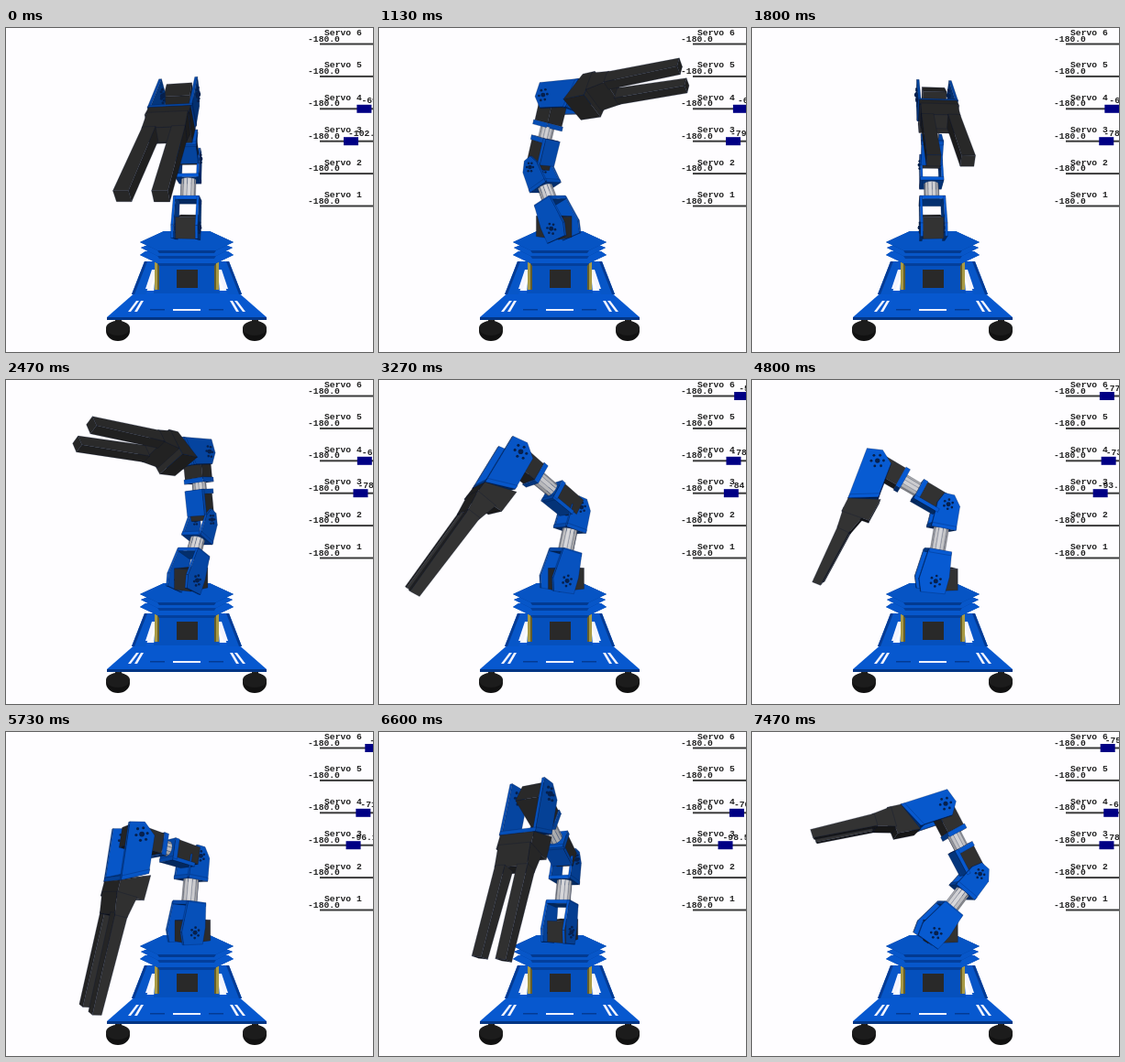
Write an HTML page with a canvas that moves like this. It is 400x354 px and loops after 7540 ms.

```html
<!DOCTYPE html>
<html lang="en">
<head>
<meta charset="utf-8">
<title>Robot arm</title>
<style>
html, body { margin: 0; width: 100%; height: 100%; overflow: hidden; background: #fefdff; }
canvas, svg { position: absolute; left: 0; top: 0; width: 400px; height: 354px; }
text { font: bold 9.7px "Liberation Mono", "DejaVu Sans Mono", monospace; fill: #222; }
</style>
</head>
<body>
<canvas id="stage" width="400" height="354"></canvas>
<svg id="panel" viewBox="0 0 400 354"></svg>
<script>
const ctx = document.getElementById('stage').getContext('2d');
const panel = document.getElementById('panel');
const LOOP = 7540, STEP = 200 / 3, LAST = 112;
const DIST = 320, EYE = 38, CX = 197, CY = 180;
const BLUE = [8, 100, 232], BLACK = [56, 56, 56], GREY = [232, 232, 235];

// step, yaw, then reach and height of elbow, wrist and tip
const KEYS = [
  [0, 9, -20, 77, 47, 129, 160, 36],
  [14, -26, -24, 75, 36, 130, 116, -6],
  [17, -50, -33, 67, -8, 142, 130, 132],
  [24, -18, -32, 68, -4, 141, 118, 118],
  [30, 8, -26, 74, 30, 136, 118, -4],
  [37, 37, -31, 67, -18, 141, 127, 120],
  [42, 56, -18, 78, 40, 138, 160, 90],
  [49, 56, -20, 79, 56, 125, 145, 0],
  [60, 65, -5, 82, 74, 82, 98, -70],
  [72, 77, -14, 81, 60, 121, 117, 1],
  [80, 72, -8, 82, 68, 94, 100, -50],
  [92, 30, -10, 82, 65, 95, 115, -68],
  [99, 26, -18, 80, 56, 130, 115, -8],
  [LAST, 75, -50, 63, -9, 135, 121, 97]
];
// step, servo 3, servo 4
const SERVOS = [[0, -102, -69], [17, -79, -61], [37, -78, -68], [49, -84, -78],
  [72, -93.6, -73], [99, -98.5, -70], [LAST, -78, -67]];

const rad = d => d * Math.PI / 180;
const mix = (a, b, k) => a + (b - a) * k;
const clamp = (v, lo, hi) => Math.min(hi, Math.max(lo, v));
const add = (a, b, k = 1) => a.map((v, i) => v + b[i] * k);
const dot = (a, b) => a[0] * b[0] + a[1] * b[1] + a[2] * b[2];
const cross = (a, b) => [a[1] * b[2] - a[2] * b[1], a[2] * b[0] - a[0] * b[2], a[0] * b[1] - a[1] * b[0]];
const unit = a => a.map(v => v / (Math.hypot(...a) || 1));
const centre = pts => pts.reduce((s, p) => add(s, p), [0, 0, 0]).map(v => v / pts.length);
const scaleAt = p => DIST / (DIST - p[2]);
const project = p => [CX + p[0] * scaleAt(p), CY + (EYE - p[1]) * scaleAt(p)];

// Links as angle from vertical and length
function links(k) {
  const out = [];
  let r = 0, y = 0;
  for (let i = 2; i < 8; i += 2) {
    out.push(Math.atan2(k[i] - r, k[i + 1] - y), Math.hypot(k[i] - r, k[i + 1] - y));
    r = k[i]; y = k[i + 1];
  }
  return out;
}
const TRACK = KEYS.map(k => [k[0], k[1], ...links(k)]);

function sample(track, n) {
  let i = 0;
  while (i < track.length - 2 && track[i + 1][0] <= n) i++;
  const a = track[i], b = track[i + 1];
  const k = Math.min(1, (n - a[0]) / (b[0] - a[0]));
  return a.map((v, j) => mix(v, b[j], k));
}

let faces = [];

function addFace(pts, mid, col, dots) {
  const c = centre(pts);
  let nrm = unit(cross(add(pts[1], pts[0], -1), add(pts[2], pts[0], -1)));
  if (dot(nrm, add(c, mid, -1)) < 0) nrm = nrm.map(v => -v);
  const view = add([0, EYE, DIST], c, -1);
  const facing = dot(nrm, unit(view));
  if (facing <= 0) return;
  const light = 0.42 + 0.5 * facing + 0.12 * nrm[1];
  faces.push({ pts, far: Math.hypot(...view), dots, fill: `rgb(${col.map(v => Math.min(255, Math.round(v * light)))})` });
}

function solid(a, b, col, dotsA, dotsB) {
  const mid = centre([...a, ...b]);
  addFace(a, mid, col, dotsA);
  addFace(b, mid, col, dotsB);
  a.forEach((p, i) => {
    const j = (i + 1) % a.length;
    addFace([p, a[j], b[j], b[i]], mid, col);
  });
}

const at = (f, u, n, w) => add(add(add(f.o, f.u, u), f.n, n), f.w, w);

function prism(f, poly, w0, w1, col, hub) {
  const side = w => poly.map(([u, n]) => at(f, u, n, w));
  const dots = w => hub && [[0, 0], ...Array.from({ length: 6 }, (_, i) =>
    [hub * Math.cos(i * Math.PI / 3), hub * Math.sin(i * Math.PI / 3)])].map(([u, n]) => at(f, u, n, w));
  solid(side(w0), side(w1), col, dots(w0), dots(w1));
}

const box = (f, u0, u1, n0, n1, w, col) =>
  prism(f, [[u0, n0], [u1, n0], [u1, n1], [u0, n1]], -w, w, col);

function plates(f, poly, w, hub) {
  prism(f, poly, w - 2.5, w, BLUE, hub);
  prism(f, poly, -w, 2.5 - w, BLUE, hub);
}

function tube(f, u0, u1, r) {
  const ring = u => Array.from({ length: 12 }, (_, i) =>
    at(f, u, r * Math.cos(i * Math.PI / 6), r * Math.sin(i * Math.PI / 6)));
  solid(ring(u0), ring(u1), GREY);
}

function buildArm([, deg, a1, l1, a2, l2, a3, l3]) {
  faces = [];
  const yaw = rad(deg);
  const fwd = [-Math.sin(yaw), 0, Math.cos(yaw)], w = [Math.cos(yaw), 0, Math.sin(yaw)];
  const frame = (o, a) => ({
    o, w,
    u: add(fwd.map(v => v * Math.sin(a)), [0, Math.cos(a), 0]),
    n: add(fwd.map(v => -v * Math.cos(a)), [0, Math.sin(a), 0])
  });
  const turret = frame([0, 0, 0], 0);
  const lower = frame([0, 0, 0], a1);
  const elbow = at(lower, l1, 0, 0);
  const lowerEnd = frame(elbow, a1), upper = frame(elbow, a2);
  const wrist = at(upper, l2, 0, 0);
  const upperEnd = frame(wrist, a2), hand = frame(wrist, a3);

  box(turret, -11, 12, -8, 25, 11, BLACK);
  plates(lower, [[-12, 12], [-13, -14], [0, -18], [32, -13], [32, 12], [6, 14]], 14, 5.5);
  box(lower, 29, 33, -12, 12, 14, BLUE);
  tube(lower, 33, l1 - 25, 8.5);

  plates(lowerEnd, [[-25, -14], [-25, 13], [0, 13], [11, 5], [11, -6], [0, -12]], 13, 5);
  box(lowerEnd, -26, -22, -14, 13, 13, BLUE);
  box(upper, 0, 30, -9, 10, 10, BLACK);
  box(upper, 6, 35, -13, -9, 12, BLUE);
  box(upper, 30, 35, -11, 10, 12, BLUE);
  tube(upper, 35, l2 - 31, 8);

  box(upperEnd, -32, -27, -11, 11, 13, BLUE);
  box(upperEnd, -27, 6, -10, 10, 12, BLACK);
  plates(hand, [[-6, 14], [-12, 0], [-4, -13], [32, -16], [46, 9]], 18, 6);
  prism(hand, [[28, -16], [32, -16], [46, 9], [42, 9]], -18, 18, BLUE);

  // The raised gripper rolls with the turn of the base
  const tipY = at(hand, l3, 0, 0)[1];
  const roll = rad(25) * clamp(deg / 37, -1, 1) * clamp((tipY - 97) / 22, 0, 1);
  const c = Math.cos(roll), s = Math.sin(roll);
  const grip = {
    o: wrist, u: hand.u,
    w: add(hand.w.map(v => v * c), hand.n, s),
    n: add(hand.n.map(v => v * c), hand.w, -s)
  };
  prism(grip, [[33, -19], [57, -18], [60, 9], [46, 9]], -17, 17, BLACK);
  prism(grip, [[56, -11], [76, -6], [76, 6], [56, 9]], -16, 16, BLACK);
  const end = (u, m, h, v) => [[-h, -v], [h, -v], [h, v], [-h, v]].map(([x, y]) => at(grip, u, y, m + x));
  for (const k of [-1, 1]) solid(end(74, k * 11, 5, 6), end(l3, k * 11, 4.5, 4), BLACK);
}

function fillPoly(pts, fill) {
  ctx.beginPath();
  pts.forEach(p => ctx.lineTo(p[0], p[1]));
  ctx.closePath();
  ctx.fillStyle = fill;
  ctx.fill();
}

function disc(x, y, rx, ry, fill) {
  ctx.beginPath();
  ctx.ellipse(x, y, rx, ry, 0, 0, 7);
  ctx.fillStyle = fill;
  ctx.fill();
}

function rect(x, y, w, h, fill) {
  ctx.fillStyle = fill;
  ctx.fillRect(x, y, w, h);
}

const flip = pts => pts.map(([x, y]) => [2 * CX - x, y]);
function pair(pts, fill) { fillPoly(pts, fill); fillPoly(flip(pts), fill); }
// Symmetric shape from its left half
const sym = (pts, fill) => fillPoly([...pts, ...flip(pts).reverse()], fill);
// Slanted bar: top left, bottom left, width
const bar = (x0, y0, x1, y1, w, fill) => pair([[x0, y0], [x0 + w, y0], [x1 + w, y1], [x1, y1]], fill);

function tier(backY, back, y, half, top, edge) {
  const rim = [[CX - back, backY], [CX - half, y], [CX - 32, y + 9]];
  sym([...rim, [CX - 30, y + 12]], edge);
  sym(rim, top);
}

function drawBase() {
  for (const x of [122, 271]) {
    rect(x - 3, 316, 7, 8, '#222');
    disc(x, 331, 13, 11, '#111');
    disc(x, 328, 13, 8, '#1c1c1c');
  }
  sym([[143, 287], [110, 316]], '#0758cf');
  sym([[110, 316], [110, 319]], '#033584');
  sym([[164, 252], [161, 290]], '#0550bd');
  bar(151, 255, 137, 291, 15, '#0756c8');
  bar(151, 255, 137, 291, 3, '#033b94');
  bar(159, 264, 152, 285, 5, '#f4f5ff');
  bar(162, 247, 162, 286, 5, '#a89a45');
  bar(165, 247, 165, 286, 2, '#655d2a');
  rect(186, 264, 23, 20, '#292929');
  bar(142, 298, 133, 310, 3, '#f4f5ff');
  bar(147, 298, 140, 310, 3, '#f4f5ff');
  rect(182, 307, 30, 2, '#eef2ff');
  bar(157, 307, 157, 308.5, 16, '#033b94');

  tier(244, 45, 248, 51, '#0757cb', '#033f9c');
  tier(231, 27, 240, 50, '#0756c8', '#033f9c');
  tier(222, 25, 234, 51, '#0654c4', '#023a91');
}

function drawArm(pose) {
  buildArm(pose);
  faces.sort((a, b) => b.far - a.far);
  ctx.lineWidth = 0.5;
  ctx.lineJoin = 'round';
  for (const f of faces) {
    fillPoly(f.pts.map(project), f.fill);
    ctx.strokeStyle = 'rgba(0,15,50,.45)';
    ctx.stroke();
    (f.dots || []).forEach((p, i) => {
      const [x, y] = project(p), r = (i ? 1.3 : 2.4) * scaleAt(p);
      disc(x, y, r, r, '#06204d');
    });
  }
}

function make(tag, attrs, text) {
  const el = document.createElementNS('http://www.w3.org/2000/svg', tag);
  for (const k in attrs) el.setAttribute(k, attrs[k]);
  if (text) el.textContent = text;
  return panel.appendChild(el);
}

const sliders = {};
for (let id = 6; id > 0; id--) {
  const y = 17.5 + (6 - id) * 35.4;
  make('rect', { x: 342, y: y - 1, width: 58, height: 2, fill: '#3a3a3a' });
  make('text', { x: 347, y: y - 9.5 }, 'Servo ' + id);
  make('text', { x: 329, y: y - 3 }, '-180.0');
  if (id === 6 || id === 4 || id === 3) sliders[id] = {
    knob: make('rect', { y: y - 4.5, width: 16, height: 9, fill: '#000084' }),
    value: make('text', { y: y - 6 })
  };
}

function setSlider(id, v) {
  const x = 342 + (v + 180) * 0.436, s = sliders[id];
  s.knob.setAttribute('x', x - 8);
  s.value.setAttribute('x', x - 3);
  s.value.textContent = v.toFixed(1);
}

const start = performance.now();
let last = -1;
function tick() {
  const t = (performance.now() - start) % LOOP;
  const n = Math.min(LAST, Math.floor((t + 4) / STEP));
  if (n !== last) {
    last = n;
    const pose = sample(TRACK, n), [, s3, s4] = sample(SERVOS, n), yaw = pose[1];
    ctx.clearRect(0, 0, 400, 354);
    drawBase();
    drawArm(pose);
    setSlider(3, s3);
    setSlider(4, s4);
    setSlider(6, -77 + (77 - yaw) * 0.9 + Math.max(0, 56 - yaw));
  }
  requestAnimationFrame(tick);
}
tick();
</script>
</body>
</html>
```
